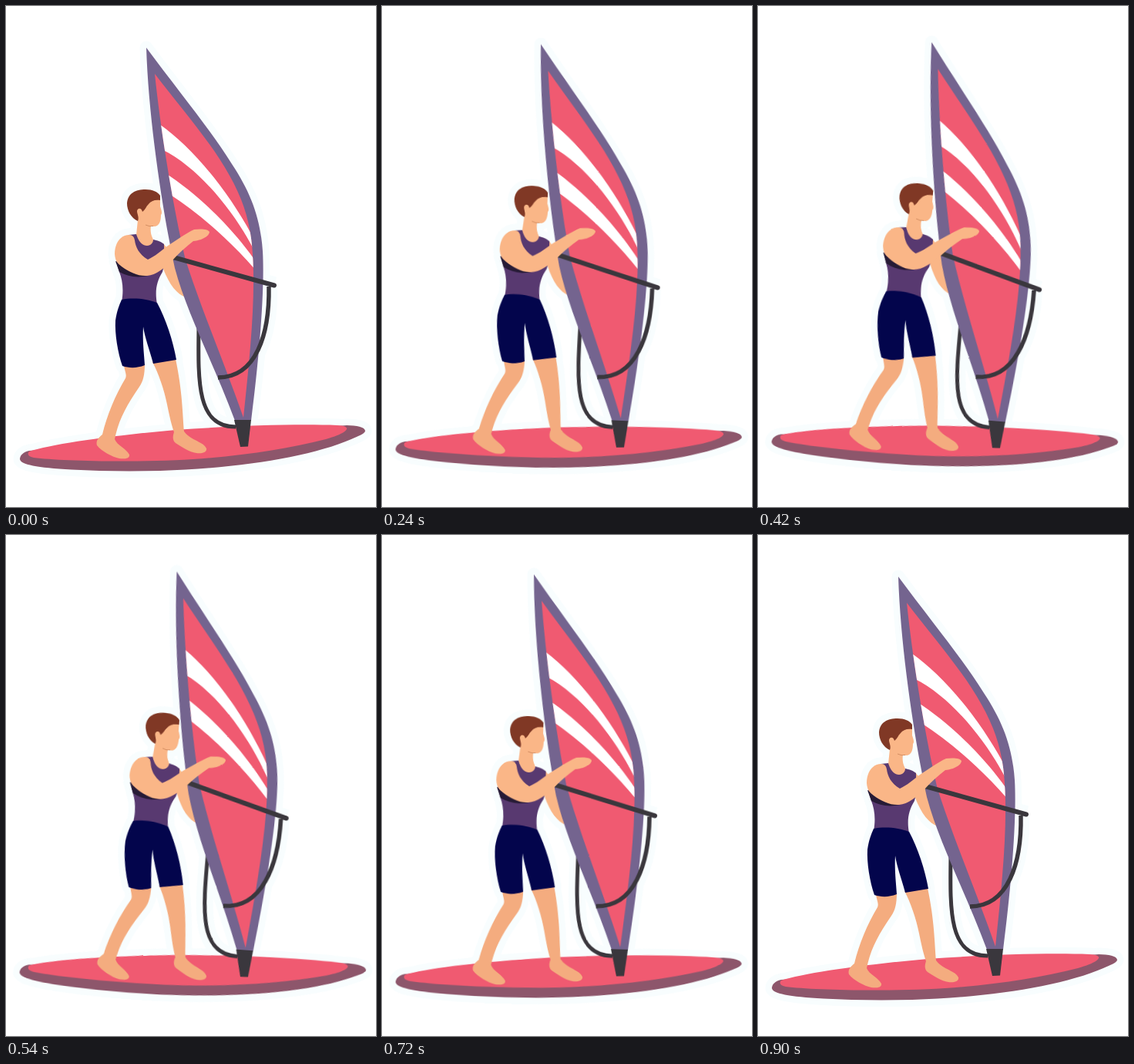
An HTML page that plays this animation: 480x650 px, repeating every 0.93 s.

```html
<!DOCTYPE html>
<html lang="en">
<head>
<meta charset="utf-8">
<title>Windsurfer</title>
<style>
  html, body { margin: 0; width: 100%; height: 100%; overflow: hidden; background: #fff; }
  svg { display: block; width: 480px; height: 650px; }
  #rider { transform-origin: 289px 572px; }
</style>
</head>
<body>
<svg viewBox="0 0 480 650">
  <defs><clipPath id="cloth"><path id="clothShape"/></clipPath></defs>
  <g id="rider"></g>
</svg>
<script>
const PINK = '#f05a71', PURPLE = '#74648f', DARK = '#3a373d';
const SKIN = '#fab687', LEG = '#f4ac7f', VEST = '#583970', NAVY = '#03054c';
const HALO = '#f8fdfe';

const cloth = 'M193 88C228 134 265 175 290 220C307 250 316 278 319 310C325 370 317 450 308 534C286 470 250 385 232 326C217 260 201 165 193 88Z';

// Back to front: filled shapes, or lines with a width
const parts = [
  // board
  { fill: '#8d566b', d: 'M30 577C22 579 18 583 18 588C19 595 40 599 85 601.5C120 603.5 160 604 200 603C300 600 395 585 448 562C460 557 466 554 466 551C465 546 455 544.5 442 544Z' },
  { fill: PINK, d: 'M30 578C60 568 140 557 220 550C290 545 370 542 430 544C440 544.5 443 547 442 549C440 553 432 557 415 562C350 578 270 590 170 590.5C110 591 60 589 36 586C29 585 27 581 30 578Z' },
  // far arm and lower line
  { fill: SKIN, d: 'M204 308L222 330L240 378L233 378C222 374 212 362 204 341Z' },
  { line: 5, d: 'M250 417C249 490 248 546 298 546' },
  // legs
  { fill: LEG, d: 'M153 466C154 474 157 478 155 483C142 504 130 534 125 556C121 559 116 564 118 570C124 578 138 585 147 587C154 588 161 587 160 582C156 574 144 570 141 562C146 537 156 519 173 494C178 487 180 478 180 465Z' },
  { fill: LEG, d: 'M190 462C198 477 205 497 209 517C212 532 215 545 218 553C216 559 216 564 220 567C228 572 238 579 247 580C254 581 261 579 260 574C256 565 240 564 231 552C229 530 229 500 220 458Z' },
  // head and neck
  { fill: SKIN, d: 'M172 268L169 297C172 307 177 312 183 312C188 312 192 308 191 303C188 297 187 292 188 285Z' },
  { fill: SKIN, d: 'M168 258L200 247L200 260C202 266 203 269 201 271C201 279 199 286 192 286C183 286 175 282 169 272Z' },
  { line: 1, color: '#d58f63', d: 'M181 284Q186 286.5 191 285.5' },
  { fill: '#803825', d: 'M171 279C162 275 157 265 157 256C158 243 168 238 181 238C190 238 197 241 200 246L200 252C193 251 188 253 185 257C181 261 181 264 177 267C176 262 171 261 170 266C170 270 173 274 171 279Z' },
  // clothes
  { fill: VEST, d: 'M159 297L169 296C172 306 177 311 183 311C188 311 191 307 191 303C196 304 202 306 205 309C205 322 206 335 203 345C195 358 193 370 196 387L150 384C153 368 151 355 147 345L143 332Z' },
  { fill: '#271b36', d: 'M142 331L147 345C158 351 170 353 184 350Z' },
  { fill: NAVY, d: 'M150 381C165 378 183 380 196 385C207 405 217 435 221 459L191 464C186 445 180 430 178 416C177 435 179 450 180 466C170 470 160 470 151 467C145 450 141 425 142 408C144 395 147 388 150 381Z' },
  // sail
  { fill: PURPLE, d: 'M182 54C225 112 265 160 293 205C318 243 330 275 333 318C336 370 328 460 318 538L297 538C270 465 235 400 219 340C204 270 185 150 182 54Z' },
  { fill: PINK, d: cloth },
  { fill: '#fff', clip: true, d: 'M200 154C240 182 288 238 322 303L322 317C299 272 253 211 203 186.5Z' },
  { fill: '#fff', clip: true, d: 'M207 217C247 243 293 286 325 333L326 345C295 309 255 272 212 244Z' },
  // rigging
  { line: 5.5, d: 'M341 364C342 425 325 482 275 482' },
  { line: 6, cap: 'round', d: 'M217 326L348 362.5' },
  { fill: DARK, d: 'M296 537L318 537L314 571.5L304 572Z' },
  // near arm
  { fill: SKIN, d: 'M160 297C148 297 141 308 141 322C142 332 145 334 150 338C160 345 172 351 183 350C195 349 205 340 215 331C225 320 234 312 243 305C255 304 264 298 264 293C262 289 252 289 244 290C235 294 222 303 210 311C202 317 193 325 184 329C172 322 168 312 167 304C166 299 164 297 160 297Z' }
];

const rider = document.getElementById('rider');
document.getElementById('clothShape').setAttribute('d', cloth);

function addPath(attrs) {
  const path = document.createElementNS('http://www.w3.org/2000/svg', 'path');
  for (const key in attrs) path.setAttribute(key, attrs[key]);
  rider.append(path);
}

// Pale rim around the whole silhouette
for (const { d, fill, line = 0 } of parts) {
  addPath({ d, fill: fill ? HALO : 'none', stroke: HALO, 'stroke-width': 17 + line, 'stroke-linejoin': 'round' });
}

for (const { d, fill, line, color = DARK, cap = 'butt', clip } of parts) {
  const attrs = line
    ? { d, fill: 'none', stroke: color, 'stroke-width': line, 'stroke-linecap': cap }
    : { d, fill };
  if (clip) attrs['clip-path'] = 'url(#cloth)';
  addPath(attrs);
}

// Sine rocking there and back, held in 30 ms steps
const STEP = 30, COUNT = 31, SWING = 4.8;
const frames = [];
for (let i = 0; i <= COUNT; i++) {
  const angle = SWING / 2 * (1 - Math.cos(Math.PI * Math.min(i, 30) / 15));
  frames.push({ transform: `rotate(${angle.toFixed(4)}deg)`, offset: i / COUNT, easing: 'step-end' });
}
const rocking = rider.animate(frames, { duration: STEP * COUNT, iterations: Infinity });
rocking.startTime = 0;
</script>
</body>
</html>
```
